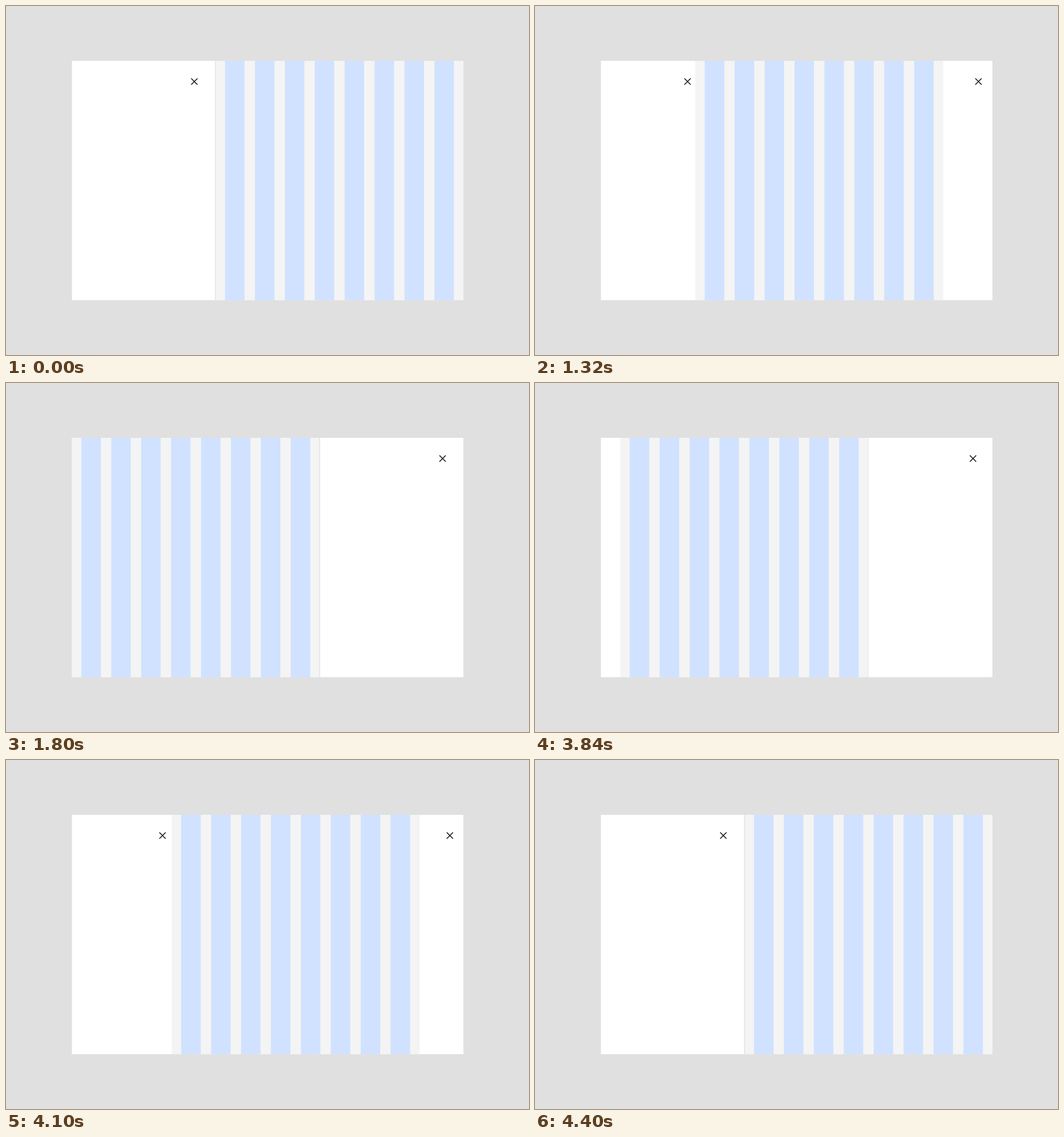
These frames come from a looping animation (917x611 px, 5.23 s). An HTML page with a canvas:

```html
<!DOCTYPE html>
<html lang="en">
<head>
<meta charset="utf-8">
<title>Sliding grid between two panels</title>
<style>
  html, body { margin: 0; width: 100%; height: 100%; overflow: hidden; background: #e0e0e0; }
  canvas { display: block; }
</style>
</head>
<body>
<canvas id="stage" width="917" height="611"></canvas>
<script>
const ctx = document.getElementById('stage').getContext('2d');

const LOOP = 5230, TICK = 20, DURATION = 610;
const TO_LEFT = { start: 1183, shown: 1200 };
const TO_RIGHT = { start: 3789, shown: 3840 };

const panel = { x: 115.4, y: 96, w: 686.8, h: 419.2 };
const grid = { left: 115.4, right: 367.3, w: 434.9 };
const bars = { count: 8, inset: 16.7, pitch: 52.45, w: 34.2 };
const travel = grid.right - grid.left;

const clamp = v => Math.min(1, Math.max(0, v));

// cubic-bezier(0, 0, 0.58, 1)
function easeOut(u) {
  let lo = 0, hi = 1;
  for (let i = 0; i < 24; i++) {
    const s = (lo + hi) / 2;
    if (1.74 * s * s - 0.74 * s * s * s < u) lo = s; else hi = s;
  }
  return lo * lo * (3 - 2 * lo);
}

function progress(t, move) {
  if (t < move.shown) return 0;
  const u = (t - move.start) / DURATION;
  return u >= 1 ? 1 : easeOut(u);
}

function rect(color, x, y, w, h) {
  ctx.fillStyle = color;
  ctx.fillRect(x, y, w, h);
}

function closeIcon(x) {
  const y = 132.3, r = 5.5;
  ctx.strokeStyle = '#161616';
  ctx.lineWidth = 1.6;
  ctx.beginPath();
  ctx.moveTo(x - r, y - r);
  ctx.lineTo(x + r, y + r);
  ctx.moveTo(x + r, y - r);
  ctx.lineTo(x - r, y + r);
  ctx.stroke();
}

function edgeLine(x, alpha) {
  ctx.globalAlpha = alpha;
  rect('#dcdcdc', x, panel.y, 1.2, panel.h);
  ctx.globalAlpha = 1;
}

function draw(t) {
  // 0: grid on the right, 1: grid on the left
  const p = progress(t, TO_LEFT) - progress(t, TO_RIGHT);
  const x = grid.right - travel * p;

  rect('#e0e0e0', 0, 0, 917, 611);
  ctx.save();
  ctx.beginPath();
  ctx.rect(panel.x, panel.y, panel.w, panel.h);
  ctx.clip();
  rect('#ffffff', panel.x, panel.y, panel.w, panel.h);

  closeIcon(330.2 - 183 * p);
  closeIcon(783.8 - 18.3 * p);

  rect('#f4f4f4', x, panel.y, grid.w, panel.h);
  for (let i = 0; i < bars.count; i++) {
    rect('#d0e2ff', x + bars.inset + i * bars.pitch, panel.y, bars.w, panel.h);
  }
  edgeLine(x - 0.6, clamp(1 - p / 0.32));
  edgeLine(x + grid.w - 1, clamp(1 - (1 - p) / 0.32));
  ctx.restore();
}

const begin = performance.now();
function frame() {
  const t = (performance.now() - begin) % LOOP;
  draw(Math.floor(t / TICK) * TICK);
  requestAnimationFrame(frame);
}
frame();
</script>
</body>
</html>
```
